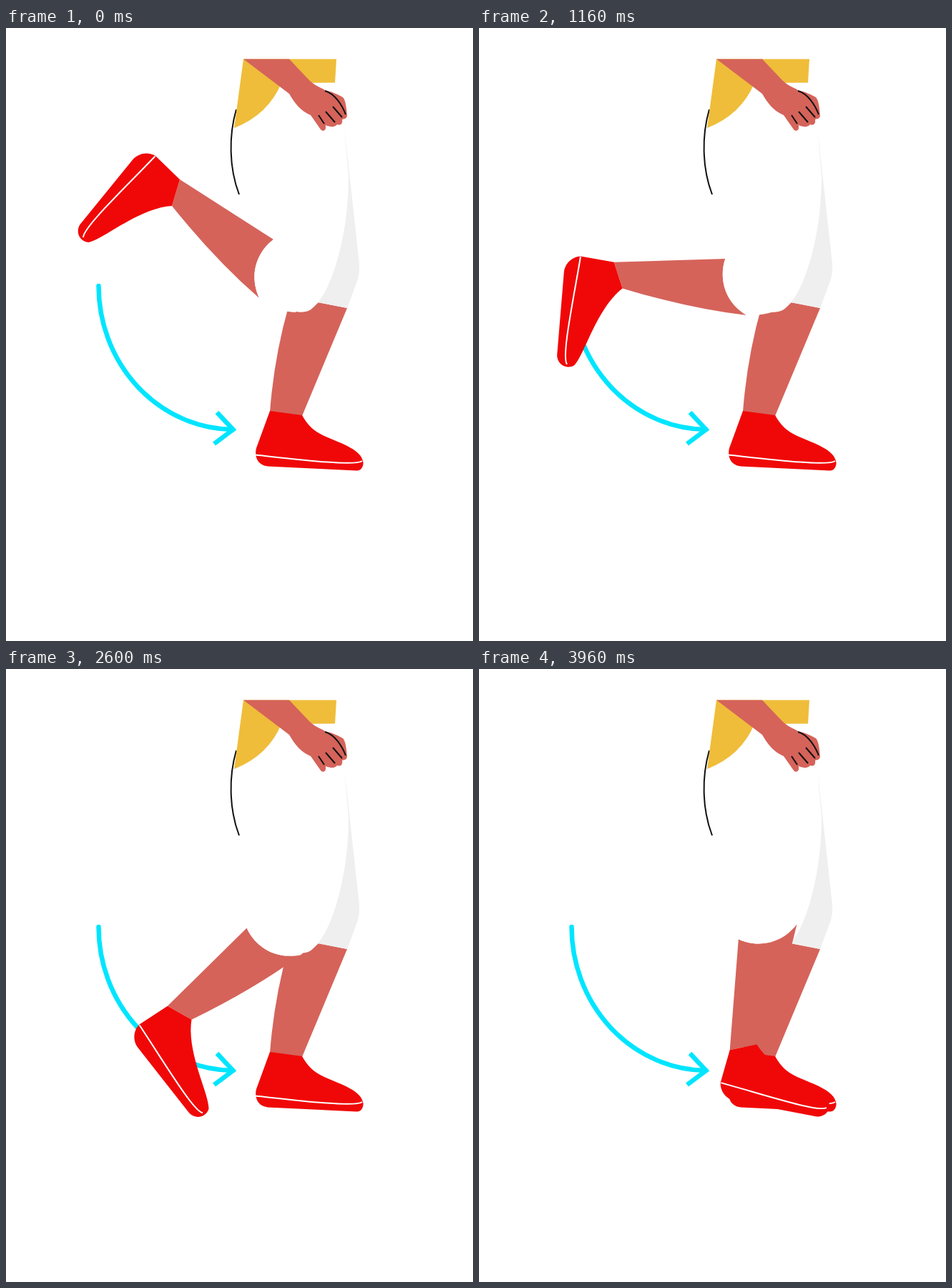
An HTML page for the animation above (4000 ms loop, 653x858 px).

```html
<!DOCTYPE html>
<html lang="en">
<head>
<meta charset="utf-8">
<title>Leg swing</title>
<style>
  html, body { margin: 0; width: 100%; height: 100%; overflow: hidden; background: #fff; }
  svg { display: block; width: 100%; height: 100%; }
  .skin { fill: #d5635a; }
  .shoe { fill: #f00808; }
  .shirt { fill: #efbd3a; }
  .shade { fill: #efefef; }
  .shorts { fill: #fff; }
  .line { fill: none; stroke: #111; stroke-width: 2; }
  .seam { fill: none; stroke: #fff; stroke-width: 2; }
  .arrow { fill: none; stroke: #00e5ff; stroke-width: 6.5; }
</style>
</head>
<body>
<svg viewBox="0 0 653 858">
  <path class="arrow" stroke-linecap="round" d="M129.5 361A190 201 0 0 0 317 562"/>
  <path class="arrow" d="M295 538L317.5 562L291 582"/>

  <!-- torso and arm -->
  <path class="line" d="M322 114C311.5 150 311.5 195 326 233"/>
  <path class="shirt" d="M332 43.5H462L460 76.5L385 77Q367 121 319 140Z"/>
  <path class="skin" d="M332 43.5H396L424 73C432 81 440 83 446 87C456 89 466 94 471 97C475 101 476 112 477 123C476 128 472 127 470 128C471 134 468 137 463 135C460 139 454 139 447 136V140C447 144 442 145 440 142L426 122C412 116 404 106 396 92Z"/>
  <path class="line" d="M446 88C460 92 470 108 475 121M437 122L445 134M447 117L460 132M457 110L470 125"/>

  <!-- standing leg -->
  <path class="skin" d="M395 390Q375 460 369 537L414 543L477 392L436 384Z"/>
  <path class="shade" d="M473 138L494 330Q495 345 490 357L477 392L436 384C456 362 479 290 479 208Z"/>
  <path class="shorts" d="M395 370L405 397C425 400 428 392 437 384L440 370Z"/>
  <path class="shoe" d="M369 536L350 588C347 600 352 612 366 613.5L490 619.5C497 620 500 613 499.5 608C497 590 470 582 445 571C430 564 422 556 414 542Z"/>
  <path class="seam" d="M349 597.5C400 603 488 614 498 606"/>

  <!-- swinging leg -->
  <g id="leg">
    <path class="skin" d="M243 212L374 296C356 309 337 340 354 378Q293 325 232 249Z"/>
    <path class="shorts" d="M374 296C356 309 337 340 354 378Q380 397 405 398L410 340Z"/>
    <path class="shoe" d="M243 212L209 179C200 173.5 186 174 177 184.5L103.5 275C97.5 284 101 298 115 300C135 297 185 252 232 249Z"/>
    <path class="seam" d="M208.5 179.5C165 225 108 279 108 293"/>
  </g>
</svg>
<script>
  const LOOP = 4000, STEP = 40;
  // Knee position and leg angle at the start, middle and end of the swing.
  const poses = [[404, 362.8, 0], [408.8, 360.3, -59.2], [407.5, 319.4, -119.4]];
  const [kneeX, kneeY] = poses[0];
  const leg = document.getElementById('leg');

  function draw(now) {
    const time = Math.floor(now % LOOP / STEP) * STEP;
    const progress = time / LOOP * 2;
    const half = Math.floor(progress);
    const part = progress - half;
    const [x, y, angle] = poses[half].map((v, i) => v + (poses[half + 1][i] - v) * part);
    leg.setAttribute('transform',
      `translate(${x} ${y}) rotate(${angle}) translate(${-kneeX} ${-kneeY})`);
  }

  const start = performance.now();
  function tick() {
    draw(performance.now() - start);
    requestAnimationFrame(tick);
  }
  tick();
</script>
</body>
</html>
```
